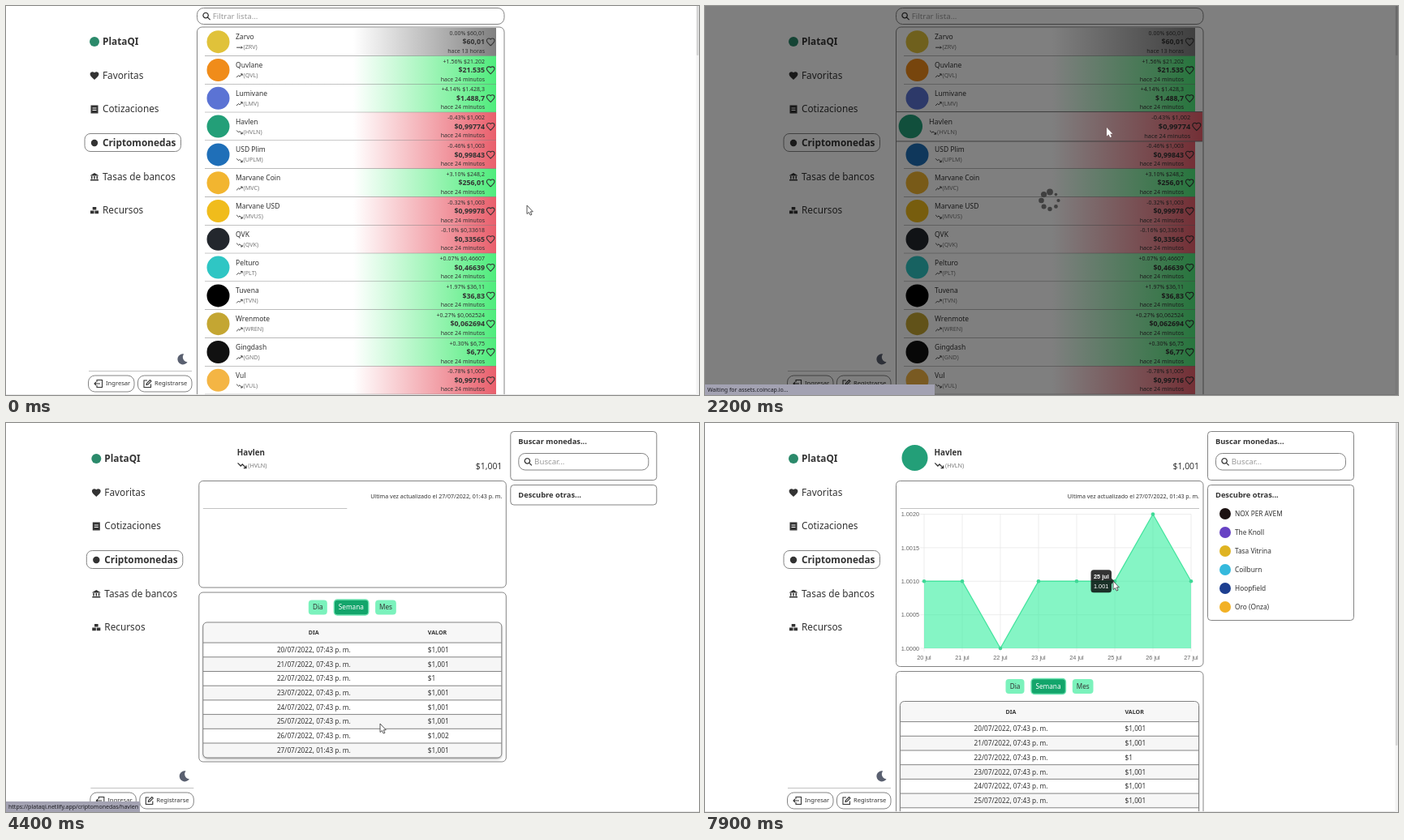
These frames come from a looping animation (854x480 px, 8 s). An HTML page with a canvas:

```html
<!DOCTYPE html>
<html lang="es">
<head>
<meta charset="utf-8">
<style>
html, body { margin: 0; width: 100%; height: 100%; overflow: hidden; background: #fff; }
canvas { display: block; width: 854px; height: 480px; }
</style>
</head>
<body>
<canvas id="stage"></canvas>
<script>
const canvas = document.getElementById('stage');
const c = canvas.getContext('2d');
const dpr = window.devicePixelRatio || 1;
canvas.width = 854 * dpr;
canvas.height = 480 * dpr;

const LOOP = 8000, OVERLAY = 2000, MODAL = 2600, DETAIL = 3900, LOADED = 4700, CHART = 4820;
const INK = '#333', GREEN = '#4fec7c', RED = '#e95f6c';
const SANS = '"Noto Sans", "Open Sans", sans-serif', ARIAL = '"Liberation Sans", Arial, sans-serif';

const icons = Object.fromEntries(Object.entries({
  heart: 'M12 21.35l-1.45-1.32C5.4 15.36 2 12.28 2 8.5 2 5.42 4.42 3 7.5 3c1.74 0 3.41.81 4.5 2.09C13.09 3.81 14.76 3 16.5 3 19.58 3 22 5.42 22 8.5c0 3.78-3.4 6.86-8.55 11.54z',
  book: 'M3 2h18v20H3zM7 8h10v2H7zM7 13h10v2H7z',
  bank: 'M2 9 12 3l10 6v1H2zM4 11h3v7H4zM10.5 11h3v7h-3zM17 11h3v7h-3zM2 19h20v3H2z',
  boxes: 'M7 3h10v8H7zM1 13h10v8H1zM13 13h10v8H13z',
  moon: 'M21 17A10.5 10.5 0 1 1 14 1.500a9.500 9.500 0 0 0 7 15.500z',
  enter: 'M8 8V3h13v18H8v-5M16 12H2M6 8l-4 4 4 4',
  edit: 'M20 13v8H3V4h8M9 15l1-4 8-8 3 3-8 8z',
  search: 'M10 3a7 7 0 1 0 .1 0M15 15l7 7',
  up: 'M1 18l7-7 4 4 9-9M15 6h6v6',
  down: 'M1 6l7 7 4-4 9 9M15 18h6v-6',
  flat: 'M1 12h20M17 8l4 4-4 4',
  close: 'M12 1a11 11 0 1 0 .1 0M8 8l8 8M16 8l-8 8'
}).map(([k, d]) => [k, new Path2D(d)]));
const arrow = new Path2D('M0 0v10.500l2.500-2 1.700 3.600 1.800-.9-1.700-3.400h3z');
const hand = new Path2D('M4 0c1 0 1.500.6 1.500 1.500V5l5 1.200c1 .3 1.500 1 1.400 2L11 13H4.500L.8 8.600c-.5-.8.5-1.600 1.300-1l.5.4V1.500C2.600.6 3 0 4 0z');

// name | ticker | logo colour | trend | previous | price
const coins = `Zarvo|ZRV|#e0c23a|flat|0.00% $60,01|$60,01
Quvlane|QVL|#f08c1a|up|+1.56% $21.202|$21.535
Lumivane|LMV|#5b73d4|up|+4.14% $1.428,3|$1.488,7
Havlen|HVLN|#239f78|down|-0.43% $1,002|$0,99774
USD Plim|UPLM|#1f6fb8|down|-0.46% $1,003|$0,99843
Marvane Coin|MVC|#f2b530|up|+3.10% $248,2|$256,01
Marvane USD|MVUS|#f0bc1c|down|-0.32% $1,003|$0,99978
QVK|QVK|#23272d|down|-0.16% $0,33618|$0,33565
Pelturo|PLT|#2fc6c4|up|+0.07% $0,46607|$0,46639
Tuvena|TVN|#000|up|+1.97% $36,11|$36,83
Wrenmote|WREN|#c4a632|up|+0.27% $0,062524|$0,062694
Gingdash|GND|#111|up|+0.30% $6,75|$6,77
Vul|VUL|#f4b544|down|-0.78% $1,005|$0,99716`.split('\n').map(r => r.split('|'));
const [NAME, TICKER, LOGO] = coins[3];

const others = [['NOX PER AVEM', '#1c1212'], ['The Knoll', '#6742c4'], ['Tasa Vitrina', '#dfb322'],
  ['Coilburn', '#35b9dd'], ['Hoopfield', '#1d3f90'], ['Oro (Onza)', '#f2b125']];
const levels = [.5, .5, 0, .5, .5, .5, 1, .5];
const chartX = i => 270 + 47 * i;

// time, x, y of the pointer
const path = [[0, 642, 246], [700, 519, 221], [900, 515, 214], [1700, 495, 150], [2300, 495, 150],
  [2900, 481, 192], [3500, 470, 370], [4400, 461, 371], [5000, 470, 374], [5300, 525, 372],
  [5500, 545, 351], [6300, 556, 160], [6600, 551, 116], [6900, 549, 118], [7500, 503, 195], [8000, 503, 195]];

function pointer(t) {
  const i = Math.max(1, path.findIndex(p => p[0] > t));
  const [a, b] = [path[i - 1], path[i]];
  let k = Math.max(0, (t - a[0]) / (b[0] - a[0]));
  k = k * k * (3 - 2 * k);
  return [a[1] + (b[1] - a[1]) * k, a[2] + (b[2] - a[2]) * k];
}

// Share of the last `span` ms during which `test` held: a transition as a function of time
function eased(t, span, test) {
  let hits = 0;
  for (let k = 0; k < 10; k++) if (test(t - span * k / 10)) hits++;
  return hits / 10;
}

function coinUnder(t) {
  const [x, y] = pointer(t);
  return t > 0 && t < MODAL && x > 245 && x < 604 ? Math.floor((y - 26.8) / 34.8) : -1;
}

function text(s, x, y, size, weight = 400, color = INK, align = 'left', family = SANS) {
  c.font = `${weight} ${size}px ${family}`;
  c.fillStyle = color;
  c.textAlign = align;
  c.fillText(s, x, y + size * .36);
}

function box(x0, y0, x1, y1, r, fill, stroke = '#777', width = .9) {
  c.beginPath();
  c.roundRect(x0, y0, x1 - x0, y1 - y0, r);
  if (fill) { c.fillStyle = fill; c.fill(); }
  if (stroke) { c.strokeStyle = stroke; c.lineWidth = width; c.stroke(); }
}

function line(x0, y0, x1, y1, color = '#777', width = .9) {
  c.beginPath();
  c.moveTo(x0, y0);
  c.lineTo(x1, y1);
  c.strokeStyle = color;
  c.lineWidth = width;
  c.stroke();
}

function disc(x, y, r, color) {
  c.beginPath();
  c.arc(x, y, r, 0, 7);
  c.fillStyle = color;
  c.fill();
}

function icon(name, x, y, size, outline = 0, color = INK) {
  c.save();
  c.translate(x - size / 2, y - size / 2);
  c.scale(size / 24, size / 24);
  c.fillStyle = c.strokeStyle = color;
  c.lineWidth = outline;
  outline ? c.stroke(icons[name]) : c.fill(icons[name], 'evenodd');
  c.restore();
}

function sidebar() {
  disc(109, 44, 6, '#2b8a6b');
  text('PlataQI', 119, 44, 11.8, 600);
  icon('heart', 109, 86, 13);
  icon('book', 109, 127.5, 12);
  icon('bank', 109, 210.5, 12);
  icon('boxes', 109, 252, 11);
  box(97, 157.5, 215.5, 179.5, 7);
  disc(109, 169, 4.2, INK);
  ['Favoritas', 'Cotizaciones', 'Criptomonedas', 'Tasas de bancos', 'Recursos'].forEach((s, i) =>
    text(s, 119, 85.5 + 41.6 * i, 11.8, i === 2 ? 700 : 500));
  icon('moon', 218, 436, 15, 0, '#5a6070');
  line(102, 450.5, 229, 450.5, '#bbb');
  box(101.5, 456, 158, 476, 8);
  icon('enter', 114, 466, 12, 2.2);
  text('Ingresar', 123, 465.5, 7.6, 500);
  box(162.5, 456, 229, 476, 8);
  icon('edit', 174.5, 466, 12, 2.2);
  text('Registrarse', 183, 465.5, 7.6, 500);
}

function coinRow(i, grow) {
  const [name, ticker, logo, trend, before, price] = coins[i];
  const scale = 1 + .05 * grow;
  c.save();
  c.translate(424.5, 44.2 + 34.8 * i);
  c.scale(scale, scale);
  c.translate(-424.5, -44);
  const g = c.createLinearGradient(428, 0, 604, 0);
  g.addColorStop(0, '#fff');
  g.addColorStop(1, trend === 'up' ? GREEN : trend === 'down' ? RED : '#808080');
  c.fillStyle = g;
  c.fillRect(245, 26.7, 359, 34.8);
  if (grow) line(245, 26.8, 604, 26.8);
  line(245, 61.5, 604, 61.5);
  disc(261.5, 44, 14, logo);
  text(name, 283, 38, 8.5, 500);
  icon(trend, 288, 51, 8.5, 2.6);
  text(`(${ticker})`, 292.5, 50.5, 7.2, 400, '#777');
  text(before, 590, 33, 7, 300, INK, 'right');
  text(price, 590, 44, 8.75, 600, INK, 'right');
  text(i ? 'hace 24 minutos' : 'hace 13 horas', 590, 55, 7, 300, INK, 'right');
  icon('heart', 597.2, 44.2, 11.5, 2.2);
  c.restore();
}

function searchField(x0, y0, x1, y1, label) {
  box(x0, y0, x1, y1, 8);
  icon('search', x0 + 11.5, (y0 + y1) / 2, 11, 2.8);
  text(label, x0 + 19.3, (y0 + y1) / 2, 9.7, 400, '#999');
}

function coinList(t) {
  searchField(235.5, 2.5, 614, 22.5, 'Filtrar lista...');
  box(235.5, 26, 614, 500, 6);
  const grow = coins.map((_, i) => eased(t, 150, u => coinUnder(u) === i));
  coins.forEach((_, i) => grow[i] || coinRow(i, 0));
  coins.map((_, i) => i).filter(i => grow[i]).sort((a, b) => grow[a] - grow[b])
    .forEach(i => coinRow(i, grow[i]));
}

function priceTable(x0, x1, y, dayX, valueX, headFill, rowFill) {
  c.fillStyle = headFill;
  c.fillRect(x0, y - 12, x1 - x0, 24.5);
  text('DIA', dayX, y, 7.1, 700, INK, 'center');
  text('VALOR', valueX, y, 7.1, 700);
  for (let i = 0; i < 8; i++) {
    const top = y + 12.6 + 17.7 * i;
    c.fillStyle = rowFill(i);
    c.fillRect(x0, top, x1 - x0, 17.7);
    line(x0, top, x1, top);
    text(`${20 + i}/07/2022, ${i === 7 ? '01' : '07'}:43 p. m.`, dayX, top + 8.9, 8.25, 400, INK, 'center');
    text(i === 2 ? '$1' : i === 6 ? '$1,002' : '$1,001', valueX, top + 8.9, 8.25);
  }
}

function modal() {
  box(294, 81, 560, 401, 6, '#f8f8f8', null);
  icon('close', 543, 98, 12.5, 2.2);
  const g = c.createLinearGradient(0, 110, 0, 391);
  g.addColorStop(0, '#e96270');
  g.addColorStop(1, '#f7f5f5');
  box(304, 110.5, 550, 390.5, 5, g, '#888');
  disc(323, 131.5, 15.5, LOGO);
  text(NAME, 342.5, 125, 8.4, 600);
  icon('down', 349.5, 138.5, 12, 2.4);
  text('(' + TICKER + ')', 356.5, 138.5, 7.2, 400, '#666');
  text('$1,001', 545, 138.5, 8.3, 500, INK, 'right');
  line(304, 154.5, 550, 154.5, 'rgba(120,60,60,.2)');
  text(`Precio de ${NAME} de la semana en Venezuela`, 314, 170.5, 8.25);
  priceTable(304.5, 549.5, 199, 395, 490.5, '#f8f8f8', i => i % 2 ? 'rgba(245,243,243,.85)' : 'transparent');
  line(304, 353.3, 550, 353.3);
  icon('heart', 357, 371.8, 14, 2);
  box(435.5, 363, 504.5, 381, 8, '#f8f8f8');
  text('Ver mas detalles', 470, 372, 7.6, 400, INK, 'center');
}

function chart(t) {
  const p = Math.min(1, Math.max(0, (t - CHART) / 1000));
  const k = 1 - (1 - p) ** 4;
  const y = v => 278 - 165.5 * v;
  for (let i = 0; i < 5; i++) {
    line(265, y(i / 4), 599, y(i / 4), '#e6e6e6', .7);
    text((1 + i * .0005).toFixed(4), 264, y(i / 4), 7.3, 400, '#666', 'right', ARIAL);
  }
  for (let i = 0; i < 8; i++) {
    line(chartX(i), 112.5, chartX(i), 282, '#e6e6e6', .7);
    text(`${20 + i} jul`, chartX(i), 289, 7.3, 400, '#666', 'center', ARIAL);
  }
  c.beginPath();
  levels.forEach((v, i) => c.lineTo(chartX(i), y(v * k)));
  c.strokeStyle = '#4fe0a0';
  c.lineWidth = 1.3;
  c.stroke();
  c.lineTo(599, 278);
  c.lineTo(270, 278);
  c.fillStyle = 'rgba(52,238,158,.6)';
  c.fill();
  levels.forEach((v, i) => disc(chartX(i), y(v * k), 2.3, '#3fd896'));

  const [mx, my] = pointer(t);
  const near = levels.findIndex((v, i) => Math.hypot(mx - chartX(i), my - y(v * k)) < 8);
  if (near < 0) return;
  const x = chartX(near), py = y(levels[near] * k);
  box(x - 29.5, py - 14, x - 4, py + 14, 3.5, 'rgba(0,0,0,.8)', null);
  c.beginPath();
  c.moveTo(x - 4, py - 3.5);
  c.lineTo(x - .5, py);
  c.lineTo(x - 4, py + 3.5);
  c.fill();
  text(`${20 + near} jul`, x - 26, py - 6.3, 7.3, 700, '#fff', 'left', ARIAL);
  text(String(+(1 + levels[near] * .002).toFixed(3)), x - 26, py + 6, 7.3, 400, '#fff', 'left', ARIAL);
}

function overFirstDay(t) {
  const [x, y] = pointer(t);
  return t > LOADED && x > 240 && x < 609 && y > 368.5 && y < 386.5;
}

function detail(t) {
  const loaded = t >= LOADED, dy = loaded ? 0 : -97.5;
  if (loaded) disc(258.5, 43, 16, LOGO);
  text(NAME, 282.5, 36, 9.8, 600);
  icon('down', 289, 52.5, 12.5, 2.4);
  text('(' + TICKER + ')', 296, 52.5, 7.2, 400, '#777');
  text('$1,001', 609, 53, 10.4, 500, INK, 'right');

  box(235.5, 71.5, 614, 300.5 + dy, 5);
  text('Ultima vez actualizado el 27/07/2022, 01:43 p. m.', 609, 90.5, 7.1, 400, INK, 'right');
  line(240.5, 105.5, loaded ? 609 : 418, 105.5, '#bbb');
  if (loaded) chart(t);

  c.save();
  c.translate(0, dy);
  box(235.5, 306.5, 614, 515.5, 5);
  box(370.5, 316, 393.5, 334, 4, '#7bf2bc', null);
  box(402, 315.5, 444.5, 334.5, 4, '#13a56b', '#6fe3b2', 1.4);
  box(452.8, 316, 478.5, 334, 4, '#7bf2bc', null);
  text('Dia', 382, 325, 8.2, 400, INK, 'center');
  text('Semana', 423, 325, 8.2, 500, '#fff', 'center');
  text('Mes', 465.7, 325, 8.2, 400, INK, 'center');
  c.shadowColor = 'rgba(0,0,0,.35)';
  c.shadowBlur = 3;
  c.shadowOffsetY = 1.5;
  box(240.5, 343.5, 608.5, 510.5, 5, '#fff', null);
  c.shadowColor = 'transparent';
  c.save();
  c.clip();
  const hover = eased(t, 400, overFirstDay);
  priceTable(240.5, 608.5, 356, 377, 517.5, '#f7f7f7', i => i % 2 ? '#f6f6f6' : i ? '#fff' : `rgba(70,228,160,${hover})`);
  c.restore();
  box(240.5, 343.5, 608.5, 510.5, 5);
  c.restore();

  box(619.5, 10.5, 799.5, 70.5, 4);
  text('Buscar monedas...', 629, 23, 9.3, 600);
  searchField(629.5, 37.5, 789.5, 58, 'Buscar...');
  box(619.5, 76.5, 799.5, loaded ? 243.5 : 101, 4);
  text('Descubre otras...', 629, 89, 9.3, 600);
  if (loaded) others.forEach(([name, color], i) => {
    disc(641, 112 + 23 * i, 7, color);
    text(name, 653, 112 + 23 * i, 8.3);
  });
}

function spinner(t) {
  const turn = Math.floor((t - 2200) / 100) * Math.PI / 4;
  for (let i = 0; i < 8; i++) {
    const a = turn - Math.PI / 2 - i * Math.PI / 4;
    disc(425 + 10.5 * Math.cos(a), 240 + 10.5 * Math.sin(a), 3.9 - .3 * i, '#404040');
  }
}

function status(s, width) {
  c.fillStyle = '#a3a2b2';
  c.fillRect(0, 467, width, 13);
  text(s, 3, 473.8, 7, 400, '#1c1c22');
}

function draw(t) {
  const scrollbar = t < MODAL || t >= LOADED;
  const dimmed = t >= OVERLAY && t < DETAIL;
  c.setTransform(dpr, 0, 0, dpr, 0, 0);
  c.fillStyle = '#fff';
  c.fillRect(0, 0, 854, 480);

  c.save();
  if (!scrollbar) c.translate(2.3, 0);
  sidebar();
  t < DETAIL ? coinList(t) : detail(t);
  c.restore();

  line(0, 479.5, 854, 479.5, '#e6e6e6');
  if (scrollbar) {
    c.fillStyle = '#f3f3f3';
    c.fillRect(850.5, 0, 3.5, 480);
    box(851, 0, 853.5, t < DETAIL ? 61 : 398, 1, '#d4d4d4', null);
  }
  if (dimmed) {
    c.fillStyle = 'rgba(0,0,0,.5)';
    c.fillRect(0, 0, 854, 480);
    t < MODAL ? spinner(t) : modal();
  }
  if (t >= OVERLAY && t < MODAL) status('Waiting for assets.coincap.io...', 283);
  if (t >= 3700 && t < 4600) status('https://plataqi.netlify.app/criptomonedas/havlen', 165);

  const [x, y] = pointer(t);
  const link = (!dimmed && coinUnder(t) >= 0) || (t > 3450 && t < DETAIL);
  c.save();
  c.translate(link ? x - 2 : x, y);
  c.fillStyle = '#fff';
  c.strokeStyle = '#444';
  c.lineWidth = .9;
  const shape = link ? hand : arrow;
  c.fill(shape);
  if (!dimmed || t >= MODAL) c.stroke(shape);
  c.restore();
}

function tick() {
  draw(performance.now() % LOOP);
  requestAnimationFrame(tick);
}
tick();
</script>
</body>
</html>
```
